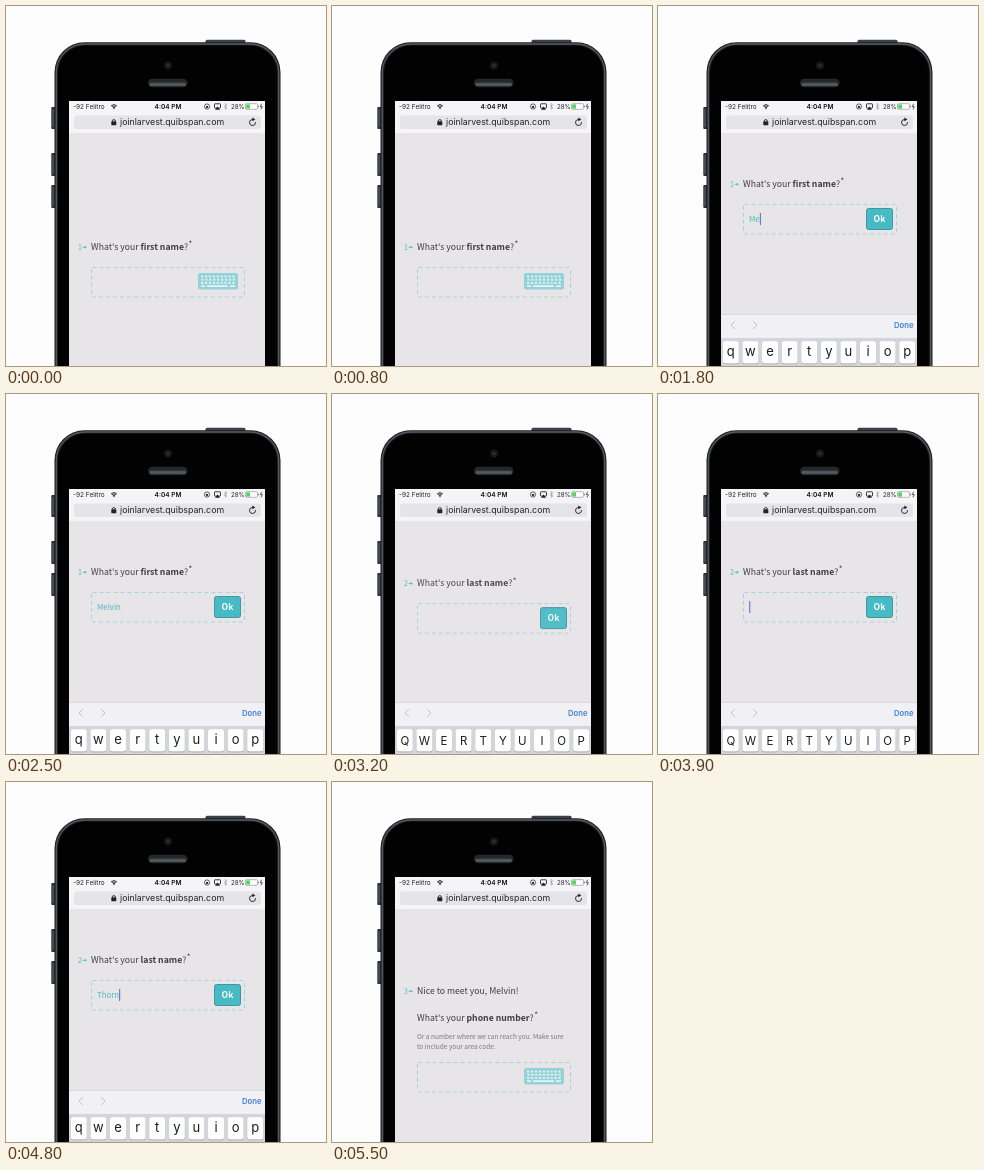
An HTML page with a canvas for the animation above (5.6 s loop, 320 px wide and 360 px high).

```html
<!DOCTYPE html>
<html lang="en">
<head>
<meta charset="utf-8">
<title>Phone form</title>
<style>
html, body { margin: 0; width: 100%; height: 100%; overflow: hidden; background: #fdfdfd; }
canvas { display: block; width: 320px; height: 360px; }
</style>
</head>
<body>
<canvas id="stage"></canvas>
<script>
const W = 320, H = 360, LOOP = 5600, STEP = 100;
const canvas = document.getElementById('stage');
const ctx = canvas.getContext('2d');
const dpr = window.devicePixelRatio || 1;
canvas.width = W * dpr;
canvas.height = H * dpr;

const FORM = '"Noto Sans CJK JP", "Noto Sans CJK SC", "Noto Sans CJK", "Noto Sans", sans-serif';
const UI = 'Inter, Roboto, sans-serif';
const TEAL = '#4bb9c2', INK = '#3d3d42', PAGE = '#e7e5e8';
const FIRST = 'Melvin', LAST = 'Thorn';
const SCREEN = { x: 63, y: 95, w: 196, h: 265 };

// Start of each keystroke, in ms
const firstKeys = [1600, 1800, 1900, 2100, 2200, 2400];
const lastKeys = [4100, 4300, 4400, 4600, 4700];

function ease(t, from, to) {
  const p = Math.min(1, Math.max(0, (t - from) / (to - from)));
  return p * p * (3 - 2 * p);
}

function typed(word, keys, t) {
  return word.slice(0, keys.filter(k => t >= k).length);
}

function text(str, x, y, size, color, weight = 400, family = FORM, align = 'left') {
  ctx.font = `${weight} ${size}px ${family}`;
  ctx.fillStyle = color;
  ctx.textAlign = align;
  ctx.fillText(str, x, y);
  return x + ctx.measureText(str).width;
}

function roundRect(x, y, w, h, r, fill, stroke, line = 1) {
  ctx.beginPath();
  ctx.roundRect(x, y, w, h, r);
  if (fill) { ctx.fillStyle = fill; ctx.fill(); }
  if (stroke) { ctx.strokeStyle = stroke; ctx.lineWidth = line; ctx.stroke(); }
}

function rect(x, y, w, h, fill) {
  ctx.fillStyle = fill;
  ctx.fillRect(x, y, w, h);
}

function polyline(points, color, width) {
  ctx.beginPath();
  points.forEach(([x, y]) => ctx.lineTo(x, y));
  ctx.strokeStyle = color;
  ctx.lineWidth = width;
  ctx.stroke();
}

function polygon(points, color) {
  ctx.beginPath();
  points.forEach(([x, y]) => ctx.lineTo(x, y));
  ctx.fillStyle = color;
  ctx.fill();
}

function arc(x, y, r, a, b, color, width) {
  ctx.beginPath();
  ctx.arc(x, y, r, a, b);
  ctx.strokeStyle = color;
  ctx.lineWidth = width;
  ctx.stroke();
}

function disc(x, y, r, color) {
  ctx.beginPath();
  ctx.arc(x, y, r, 0, Math.PI * 2);
  ctx.fillStyle = color;
  ctx.fill();
}

function drawPhone() {
  rect(0, 0, W, H, '#fdfdfd');
  roundRect(199.5, 33.8, 40, 6, 1.5, '#3c4046');
  [[101, 22], [147, 23], [179, 23]].forEach(([y, h]) => {
    roundRect(45.3, y, 5, h, 1, '#2b2e33');
    rect(46.5, y + 2, 1, h - 4, '#5f646a');
  });
  roundRect(48.5, 36.2, 226, 400, 30, '#1c1f23');
  roundRect(50.3, 38, 222.4, 400, 28.5, null, '#555b62', 1.3);
  roundRect(52, 39.6, 219, 400, 27, '#020203');
  disc(162, 59.5, 4, '#17181b');
  disc(162, 59.5, 1.8, '#2b2d36');
  roundRect(142, 72.8, 39.5, 8.4, 4.2, '#25282b');
  roundRect(143.5, 76.8, 36.5, 3.2, 1.6, '#50565a');
}

function drawStatus() {
  const y = 103.3;
  text('-92 Felitro', 67, y, 6.5, '#222', 400, UI);
  for (const r of [1.4, 2.8, 4.1]) arc(108, 102.8, r, -Math.PI * 0.76, -Math.PI * 0.24, '#222', 0.9);
  disc(108, 102.6, 0.7, '#222');
  text('4:04 PM', 162, y, 6.5, '#111', 600, UI, 'center');

  arc(201, 100.5, 2.6, 0, Math.PI * 2, '#222', 0.7);
  rect(199.9, 100, 2.2, 1.8, '#222');
  roundRect(208.5, 97.8, 6, 4.3, 0.6, null, '#222', 0.9);
  polygon([[211.5, 100.5], [214, 103.7], [209, 103.7]], '#222');
  polyline([[218, 98.8], [221, 102], [219.5, 103.5], [219.5, 97.3], [221, 98.8], [218, 102]], '#999', 0.6);

  text('28%', 225, y, 6.2, '#222', 400, UI);
  roundRect(239.5, 97.7, 12, 5.6, 1.1, '#fff', '#888', 0.6);
  rect(240.2, 98.4, 3.8, 4.2, '#4bd964');
  rect(252, 99.5, 0.8, 2, '#888');
  polyline([[255.6, 97.8], [254.3, 100.6], [256.3, 100.6], [255, 103.3]], '#333', 0.8);
}

function drawHeader() {
  rect(SCREEN.x, SCREEN.y, SCREEN.w, 32, '#f5f4f7');
  drawStatus();
  roundRect(68, 109.5, 187, 13.5, 2.5, '#e5e4e8');
  roundRect(105.3, 115.2, 5, 4, 0.6, '#222');
  arc(107.8, 115.2, 1.6, Math.PI, 0, '#222', 0.9);
  text('joinlarvest.quibspan.com', 114, 119.4, 8.8, '#222', 400, UI);
  arc(246.5, 116.5, 3, -0.15, Math.PI * 1.6, '#222', 0.9);
  polygon([[246.3, 111.6], [249.4, 113.4], [246.3, 115.2]], '#222');
}

function drawNumber(n, y) {
  text(n, 72, y, 7, TEAL);
  polyline([[76.6, y - 2.7], [79, y - 2.7]], TEAL, 0.8);
  polygon([[78.6, y - 4.2], [80.9, y - 2.7], [78.6, y - 1.2]], TEAL);
}

function drawQuestion(bold, y) {
  let x = text("What's your ", 85, y, 8.7, INK);
  x = text(bold, x, y, 8.7, INK, 700);
  x = text('?', x, y, 8.7, INK);
  text('*', x + 0.5, y - 2.6, 8, INK);
}

function drawKeyboardIcon(x, y) {
  const key = '#e4f0f2';
  roundRect(x, y, 40, 16.5, 2, '#93d3d8');
  for (let row = 0; row < 3; row++) {
    for (let col = 0; col < 9; col++) {
      rect(x + 3 + col * 3.9 + (row % 2) * 0.5, y + 2.6 + row * 3.2, 2.3, 1.8, key);
    }
  }
  [[3, 4], [9, 21], [32, 5]].forEach(([dx, w]) => rect(x + dx, y + 12.2, w, 1.8, key));
}

function drawField(y, value, active, caret, pressed) {
  ctx.setLineDash([4, 3]);
  roundRect(85.5, y + 0.5, 153, 29.5, 1, null, '#9dd2d6', 0.9);
  ctx.setLineDash([]);
  if (!active) {
    drawKeyboardIcon(192, y + 6);
    return;
  }
  const end = text(value, 91, y + 18, 7.8, TEAL);
  if (caret) rect(end + 0.2, y + 9, 1.1, 12, '#6673c4');
  roundRect(208.5, y + 4.5, 26, 21, 2, pressed ? '#3699a3' : '#46bac5', '#3a8f98', 0.9);
  text('Ok', 221.5, y + 18.3, 8.6, '#fff', 700, FORM, 'center');
}

function drawNameStep(n, bold, y, alpha, field) {
  if (alpha <= 0) return;
  ctx.globalAlpha = alpha;
  drawNumber(n, y);
  drawQuestion(bold, y);
  drawField(y + 17, field.value, field.active, field.caret, field.pressed);
  ctx.globalAlpha = 1;
}

function drawPhoneStep(y, alpha) {
  if (alpha <= 0) return;
  ctx.globalAlpha = alpha;
  drawNumber('3', y);
  text(`Nice to meet you, ${FIRST}!`, 85, y, 8.7, INK);
  drawQuestion('phone number', y + 27);
  text('Or a number where we can reach you. Make sure', 85, y + 44.6, 6.55, '#77777c');
  text('to include your area code.', 85, y + 54.8, 6.55, '#77777c');
  drawField(y + 68, '', false);
  ctx.globalAlpha = 1;
}

function drawKeyboard(shown, upper) {
  if (shown <= 0) return;
  const y = 308 + (1 - shown) * 54;
  rect(SCREEN.x, y, SCREEN.w, 24, '#f0f0f5');
  rect(SCREEN.x, y, SCREEN.w, 0.6, '#c9cacf');
  for (const [x, d] of [[73, 1], [99, -1]]) {
    polyline([[x + 4 * d, y + 7], [x, y + 11], [x + 4 * d, y + 15]], '#c3c4c9', 1);
  }
  text('Done', 255.5, y + 14.4, 7.7, '#3f80d6', 600, UI, 'right');
  rect(SCREEN.x, y + 24, SCREEN.w, 60, '#d3d5db');
  [...'qwertyuiop'].forEach((key, i) => {
    const x = 64.8 + i * 19.6;
    roundRect(x, y + 28, 16, 22.3, 2.5, '#9a9ca2');
    roundRect(x, y + 27.2, 16, 22.3, 2.5, '#fefefe');
    const label = upper ? key.toUpperCase() : key;
    text(label, x + 8, y + (upper ? 43 : 42), upper ? 11.5 : 13, '#1c1c1e', 400, UI, 'center');
  });
}

function draw(t) {
  const focus = ease(t, 900, 1400);
  const next = ease(t, 2700, 3300);
  const last = ease(t, 5000, 5400);
  const first = typed(FIRST, firstKeys, t);
  const surname = typed(LAST, lastKeys, t);

  ctx.setTransform(dpr, 0, 0, dpr, 0, 0);
  drawPhone();
  ctx.save();
  ctx.beginPath();
  ctx.rect(SCREEN.x, SCREEN.y, SCREEN.w, SCREEN.h);
  ctx.clip();
  rect(SCREEN.x, SCREEN.y, SCREEN.w, SCREEN.h, PAGE);

  drawNameStep('1', 'first name', 244 - 63 * focus - 150 * next, 1 - next, {
    value: first, active: t >= 1000, caret: t >= 1300 && t < 2500, pressed: t >= 2600
  });
  drawNameStep('2', 'last name', 181 + 150 * (1 - next) - 180 * last, next * (1 - last), {
    value: surname, active: true, caret: t >= 3300 && t < 4900, pressed: t >= 4900
  });
  drawPhoneStep(212 + 150 * (1 - last), last);

  const upper = t < firstKeys[0] || (t >= 3000 && t < lastKeys[0]);
  drawKeyboard(ease(t, 900, 1300) - ease(t, 5000, 5300), upper);
  drawHeader();
  ctx.restore();
}

function frame(now) {
  draw(Math.floor((now % LOOP) / STEP) * STEP);
  requestAnimationFrame(frame);
}
requestAnimationFrame(frame);
</script>
</body>
</html>
```
